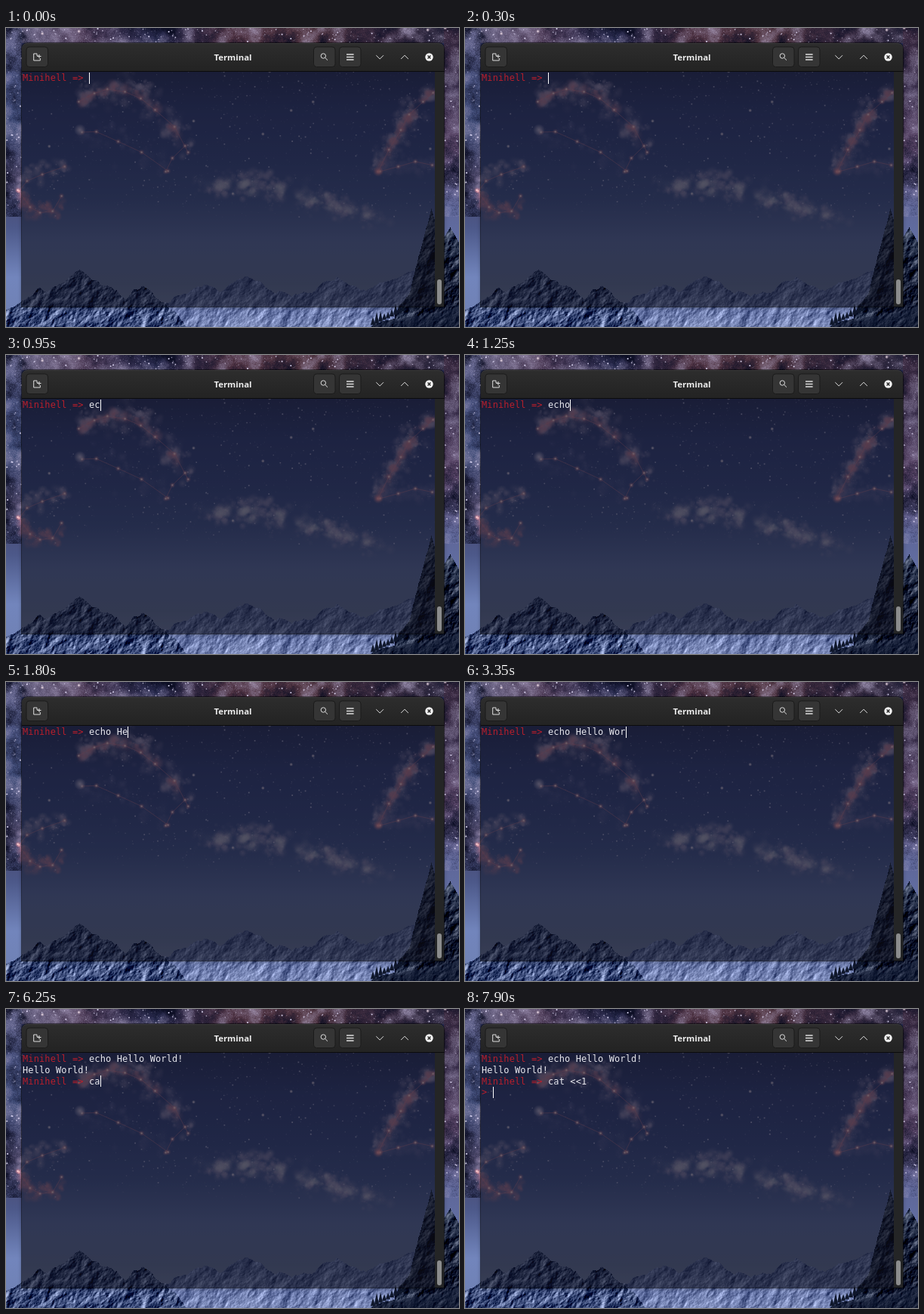
Write an HTML page with a canvas that moves like this. It is 600x396 px and loops after 8000 ms.

```html
<!DOCTYPE html>
<html lang="en">
<head>
<meta charset="utf-8">
<title>Terminal</title>
<style>
html, body { margin: 0; width: 100%; height: 100%; overflow: hidden; background: #1d2342; }
#stage { position: relative; width: 600px; height: 396px; overflow: hidden; }
#stage > * { position: absolute; }
#scene, #icons { left: 0; top: 0; }
#window {
  left: 21px; top: 20px; width: 559px; height: 349px;
  border-radius: 7px 7px 0 0; background: rgba(14, 16, 29, .6);
  box-shadow: 0 0 0 1px rgba(0, 0, 0, .5), 0 1px 5px rgba(0, 0, 0, .4);
}
#bar {
  left: 21px; top: 20px; width: 559px; height: 38px; box-sizing: border-box;
  border-radius: 7px 7px 0 0; background: linear-gradient(#2d2d2d, #232323);
  border-top: 1px solid #383838; border-bottom: 1px solid #0b0b0c;
  color: #eee; font: bold 11.4px/35px "Noto Sans", sans-serif; text-align: center;
}
#track { left: 568px; top: 58px; width: 12px; height: 311px; background: #242526; }
#thumb { left: 571px; top: 333px; width: 6px; height: 33px; border-radius: 3px; background: #8b8c8d; }
#screen {
  left: 22px; top: 59px; margin: 0; color: #e8e8ee; white-space: pre;
  font: 11.95px/14.75px "DejaVu Sans Mono", monospace; letter-spacing: .145px;
}
#screen b { color: #b81f2c; font-weight: normal; }
#cursor { width: 1px; height: 15px; background: #fff; }
</style>
</head>
<body>
<div id="stage">
  <canvas id="scene" width="600" height="396"></canvas>
  <div id="window"></div>
  <div id="bar">Terminal</div>
  <div id="track"></div>
  <div id="thumb"></div>
  <svg id="icons" width="600" height="60" fill="none" stroke="#ddd">
    <g fill="#353535" stroke="#1b1b1b">
      <rect x="27" y="25" width="28.5" height="26.5" rx="4"/>
      <rect x="407.5" y="25" width="28.5" height="26.5" rx="4"/>
      <rect x="441.5" y="25" width="28.5" height="26.5" rx="4"/>
    </g>
    <path d="M41 34H36.7V43H45.3V40M41 34V37H43M44 35V40M41.5 37.5H46.5"/>
    <circle cx="420.3" cy="37" r="3.2"/>
    <path d="M422.7 39.4L426 42.7"/>
    <path d="M451 35H460.6M451 38.5H460.6M451 42H460.6" stroke-width="1.4"/>
    <path d="M490.3 36.2L495.2 41L500 36.2M523.2 41L528 36.2L532.9 41"/>
    <circle cx="560.5" cy="38.5" r="5.2" fill="#f4f4f4" stroke="none"/>
    <path d="M558.6 36.6L562.4 40.4M562.4 36.6L558.6 40.4" stroke="#262626" stroke-width="1.4"/>
  </svg>
  <pre id="screen"></pre>
  <div id="cursor"></div>
</div>
<script>
const WIDTH = 600, HEIGHT = 396;
const ctx = document.getElementById('scene').getContext('2d');
let seed = 11;
const random = () => (seed = seed * 16807 % 2147483647) / 2147483647;
const scatter = amount => (random() + random() - 1) * amount;
const mix = (a, b, k) => a + (b - a) * k;

// Value noise, summed over octaves; the result lies around .5
function hash(x, y) {
  const h = Math.sin(x * 127.1 + y * 311.7) * 43758.5453;
  return h - Math.floor(h);
}

function noise(x, y) {
  const ix = Math.floor(x), iy = Math.floor(y);
  const ease = k => k * k * (3 - 2 * k);
  const u = ease(x - ix), v = ease(y - iy);
  return mix(mix(hash(ix, iy), hash(ix + 1, iy), u), mix(hash(ix, iy + 1), hash(ix + 1, iy + 1), u), v);
}

function fbm(x, y) {
  let sum = 0;
  for (let i = 0; i < 4; i++) sum += noise(x * 2 ** i + i * 17, y * 2 ** i) / 2 ** (i + 1);
  return sum / .94;
}

function gradientRect(colors, x, y, w, h, vertical = true) {
  const fill = vertical ? ctx.createLinearGradient(0, y, 0, y + h) : ctx.createLinearGradient(x, 0, x + w, 0);
  colors.forEach((color, i) => fill.addColorStop(i / (colors.length - 1), color));
  ctx.fillStyle = fill;
  ctx.fillRect(x, y, w, h);
}

function glow(x, y, radius, color, alpha) {
  const fade = ctx.createRadialGradient(x, y, 0, x, y, radius);
  fade.addColorStop(0, `rgba(${color},${alpha})`);
  fade.addColorStop(1, `rgba(${color},0)`);
  ctx.fillStyle = fade;
  ctx.fillRect(x - radius, y - radius, radius * 2, radius * 2);
}

// Light and dark wisps over a strip of sky
function marble(x0, y0, w, h) {
  for (let x = x0; x < x0 + w; x++) for (let y = y0; y < y0 + h; y++) {
    const wisp = (fbm(x / 22, y / 22) - .5) * 2.2 + (random() - .5) * .25;
    ctx.fillStyle = wisp > 0 ? `rgba(190,180,215,${wisp * .75})` : `rgba(12,14,36,${-wisp * 1.3})`;
    ctx.fillRect(x, y, 1, 1);
  }
}

function stars(count, x, y, w, h, brightness) {
  for (let i = 0; i < count; i++) {
    const power = random() ** 4, size = .8 + power;
    ctx.fillStyle = `rgba(228,222,250,${brightness * mix(.25, 1, power)})`;
    ctx.fillRect(x + random() * w, y + random() * h, size, size);
  }
}

// A bend runs from one point to another, pulled towards a third.
const bend = (from, pull, to) => k =>
  [0, 1].map(i => mix(mix(from[i], pull[i], k), mix(pull[i], to[i], k), k));

function cloud(curve, width, color, alpha, count) {
  for (let i = 0; i < count; i++) {
    const k = random(), [cx, cy] = curve(k);
    const reach = width * (.5 + Math.sin(k * Math.PI) / 2);
    const x = cx + scatter(reach), y = cy + scatter(reach);
    const density = fbm(x / 13, y / 13) - .38;
    if (density > 0) glow(x, y, 1 + random() ** 2 * 7, color, Math.min(1, alpha * density * 4));
  }
}

function constellation(curve, count) {
  const points = Array.from({ length: count }, (_, i) =>
    curve(i / (count - 1)).map(v => v + scatter(4)));
  ctx.beginPath();
  points.forEach(p => ctx.lineTo(...p));
  ctx.strokeStyle = 'rgba(220,130,145,.55)';
  ctx.lineWidth = .8;
  ctx.stroke();
  for (const [x, y] of points) {
    glow(x, y, 4, '255,150,160', .6);
    glow(x, y, 2, '255,225,225', 1);
  }
}

// Each peak is [x, y, steepness]; rock is lit along the slope of the noise.
function mountains(peaks, top, bottom, contrast, from = 0, to = WIDTH) {
  for (let x = from; x < to; x++) {
    const slope = Math.min(...peaks.map(([px, py, steep]) => py + steep * Math.abs(x - px)));
    const ridge = Math.round(slope + (fbm(x / 14, slope / 40) - .5) * 16);
    for (let y = ridge; y < HEIGHT; y++) {
      const depth = Math.min(1, (y - ridge) / 65);
      const rock = fbm(x / 11 + y / 30, y / 13) - fbm((x + 1.6) / 11 + y / 30, (y + .8) / 13);
      const light = rock * contrast + (random() - .5) * contrast * .035;
      ctx.fillStyle = `rgb(${top.map((v, i) => mix(v, bottom[i], depth) + light)})`;
      ctx.fillRect(x, y, 1, 1);
    }
  }
}

function paintScene() {
  gradientRect(['#252a50', '#2b325f', '#35417a', '#3b4a84', '#475891', '#6474a9', '#6a789f', '#8590b4'], 0, 0, WIDTH, HEIGHT);
  gradientRect(['#686789', '#4c3a55', '#292c50', '#4b3040', '#503541', '#382a40', '#343149'], 0, 0, WIDTH, 20, false);
  gradientRect(['#6b6a91', '#49527f', '#3c4873', '#4b4668', '#4c5889', '#7285bc', '#6f80b2'], 0, 0, 21, HEIGHT);
  gradientRect(['#3c2b41', '#3b304d', '#5b4668', '#5e6698', '#6474aa', '#6474aa'], 580, 0, 20, HEIGHT);
  marble(0, 0, WIDTH, 20);
  marble(0, 20, 21, 230);
  marble(580, 20, 20, 230);

  stars(1000, 21, 20, 559, 230, .65);
  stars(300, 270, 20, 300, 130, .7);
  stars(380, 0, 0, WIDTH, 20, 1);
  stars(110, 0, 20, 21, 220, 1);
  stars(90, 580, 20, 20, 200, 1);
  for (let i = 0; i < 14; i++) glow(random() * WIDTH, random() ** 2 * 230, 2.5, '255,235,245', .9);

  const mauve = '170,155,190', rose = '190,125,150', haze = '90,96,150';
  const bullBack = bend([98, 100], [165, 40], [242, 162]);
  const bullBelly = bend([98, 135], [140, 135], [214, 190]);
  const crabTop = bend([16, 216], [30, 195], [80, 184]);
  const crabBottom = bend([16, 216], [50, 270], [74, 222]);
  const fishBack = bend([567, 83], [525, 115], [493, 190]);
  const fishFin = bend([493, 190], [530, 175], [567, 180]);
  const milkyWay = bend([255, 207], [350, 200], [500, 257]);

  cloud(bullBack, 28, mauve, .32, 650);
  cloud(bullBack, 9, rose, .4, 220);
  cloud(bullBelly, 30, haze, .4, 350);
  cloud(crabTop, 20, mauve, .35, 230);
  cloud(crabBottom, 17, rose, .4, 260);
  cloud(fishBack, 24, mauve, .32, 520);
  cloud(fishBack, 8, rose, .4, 200);
  cloud(fishFin, 18, haze, .45, 220);
  cloud(milkyWay, 26, mauve, .24, 1000);
  cloud(milkyWay, 12, '195,192,210', .25, 300);

  constellation(bullBack, 8);
  constellation(bullBelly, 5);
  constellation(bend([214, 190], [214, 170], [240, 158]), 3);
  constellation(crabTop, 4);
  constellation(crabBottom, 5);
  constellation(fishBack, 6);
  constellation(fishFin, 4);
  glow(98, 135, 8, '225,210,235', .8);
  glow(493, 190, 7, '255,150,155', .75);

  mountains([[265, 338, .5], [318, 331, .45], [438, 331, .45], [545, 321, .4]],
    [84, 99, 150], [128, 142, 188], 420, 190);
  mountains([[45, 345, .7], [97, 322, .6], [181, 340, .9]], [54, 69, 112], [66, 82, 128], 720, 0, 250);
  mountains([[563, 240, 3.8], [588, 262, 1.6]], [31, 42, 68], [20, 28, 52], 480, 515);
  mountains([[600, 366, .26]], [24, 33, 58], [14, 21, 42], 260, 480);
  ctx.fillStyle = '#0f172b';
  for (let x = 486; x < 530; x += 5) {
    const foot = 396 - (x - 480) * .45, height = 8 + random() * 7;
    ctx.beginPath();
    ctx.moveTo(x - 3, foot);
    ctx.lineTo(x, foot - height);
    ctx.lineTo(x + 3, foot);
    ctx.fill();
  }
}

const LOOP = 8000, CELL = 7.34, ROW = 14.75;
const PROMPT = 'Minihell => ';

// Keys are struck evenly between the start and end of each burst.
const BURSTS = [
  { text: 'e', start: 600, end: 600 },
  { text: 'cho Hello', start: 850, end: 2300 },
  { text: ' World!', start: 2650, end: 3800 },
  { text: '\n', start: 4050, end: 4050 },
  { text: 'ca', start: 6200, end: 6250 },
  { text: 't <<1', start: 6850, end: 7450 },
  { text: '\n', start: 7900, end: 7900 }
];
const screenText = document.getElementById('screen');
const cursor = document.getElementById('cursor');
let shown = null;

const typedAt = t => BURSTS.map(({ text, start, end }) => {
  const step = (end - start) / (text.length - 1) || 1;
  return t < start ? '' : text.slice(0, Math.floor((t - start) / step + 1e-6) + 1);
}).join('');

function cursorVisible(t) {
  const idle = t >= 4600 && t < 6200;
  return !idle || Math.floor((t - 4600) / 600) % 2 === 1;
}

function showTyped(typed) {
  const [first, second, third] = typed.split('\n');
  const lines = [[PROMPT, first]];
  if (second !== undefined) lines.push(['', 'Hello World!'], [PROMPT, second]);
  if (third !== undefined) lines.push(['> ', third]);

  screenText.replaceChildren(...lines.flatMap(([prompt, text]) => {
    const label = document.createElement('b');
    label.textContent = prompt;
    return [label, text + '\n'];
  }));
  const row = lines.length - 1;
  cursor.style.left = Math.round(22 + lines[row].join('').length * CELL) + 'px';
  cursor.style.top = Math.round(58.8 + row * ROW) + 'px';
}

function draw() {
  const t = performance.now() % LOOP;
  const typed = typedAt(t);
  if (typed !== shown) showTyped(shown = typed);
  cursor.style.visibility = cursorVisible(t) ? 'visible' : 'hidden';
  requestAnimationFrame(draw);
}

paintScene();
draw();
</script>
</body>
</html>
```
